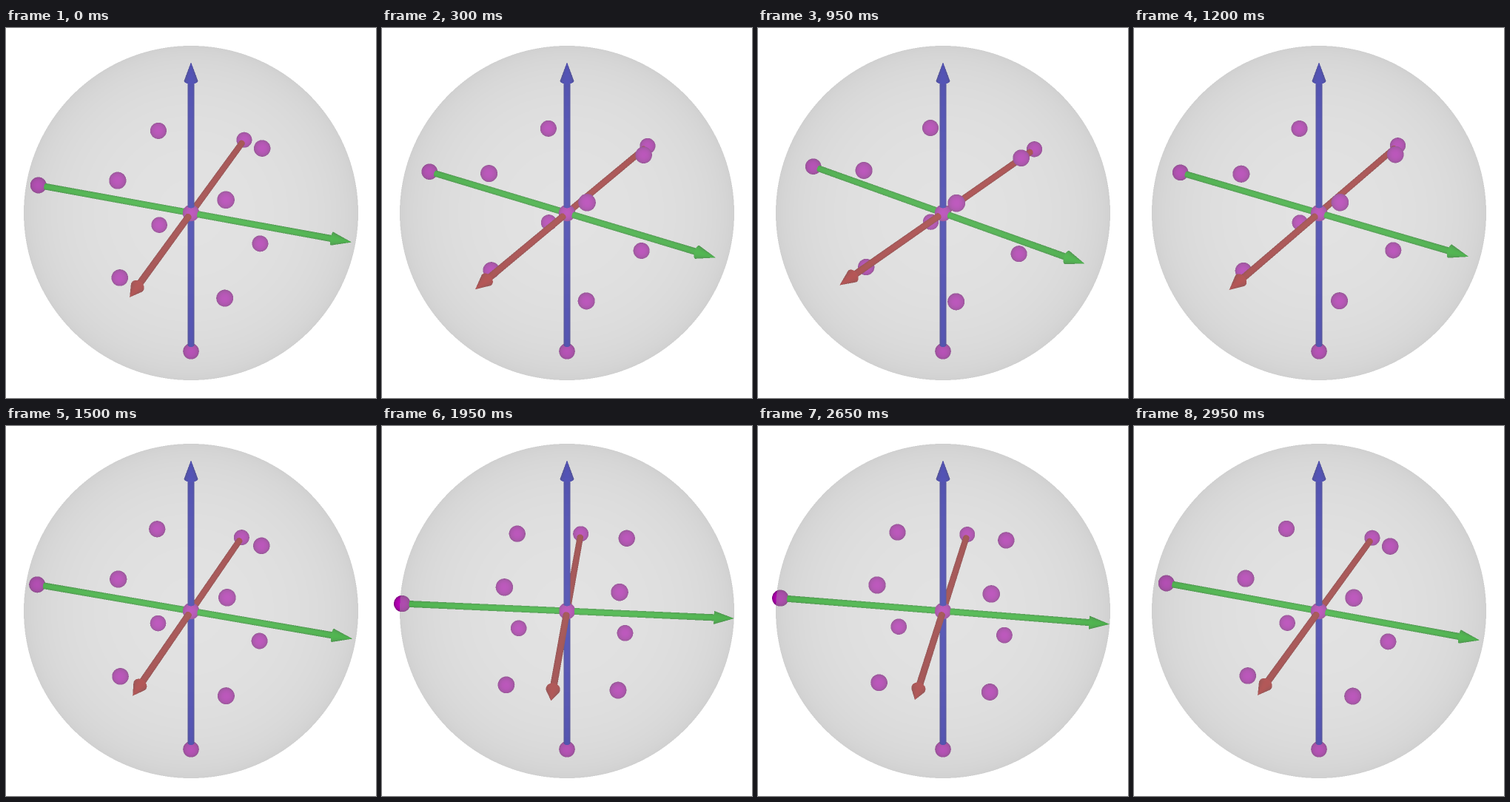
These frames come from a looping animation (500x500 px, 3 s). A matplotlib script:

```python
from itertools import product

import matplotlib.pyplot as plt
import numpy as np
from matplotlib.animation import FuncAnimation

SIZE, SS = 500, 2
FRAMES, INTERVAL = 60, 50
DIST, ELEV = 11.45, np.radians(30)
FOCAL = 226 * np.sqrt(DIST**2 - 1)

BALL_R, SHAFT_R, HEAD_R, HEAD_LEN = 0.05, 0.02, 0.04, 0.12
ALPHA = 0.47
MAGENTA = (1, 0, 1)

AXES = np.eye(3)
BALLS = [np.zeros(3), *-AXES, *(np.array(p) / 3 for p in product((-1, 1), repeat=3))]

# Viewing rays (X, Y, -1) from a camera at (0, 0, DIST)
N = SIZE * SS
pix = ((np.arange(N) + 0.5) / SS - SIZE / 2) / FOCAL
X, Y = np.meshgrid(pix, -pix)
DD = X**2 + Y**2 + 1

# Translucent unit sphere: depth of its front and its grey shade
disc = DIST**2 - DD * (DIST**2 - 1)
inside = disc > 0
front = np.where(inside, (DIST - np.sqrt(np.maximum(disc, 0))) / DD, np.inf)
glass = np.where(inside, 148 + 45 * np.clip(DIST - front, 0, 1), 0)
backdrop = np.where(inside, (1 - ALPHA) * 255 + ALPHA * glass, 255)
backdrop = np.repeat(backdrop[..., None], 3, axis=2)


def azimuth(i):
    w = 2 * np.pi * i / (FRAMES - 1)
    return np.radians(20 + 17.5 * np.sin(w) + 0.6 * np.sin(3 * w))


def view_matrix(t):
    c, s, ce, se = np.cos(t), np.sin(t), np.cos(ELEV), np.sin(ELEV)
    return np.array([[-s, c, 0], [-se * c, -se * s, ce], [ce * c, ce * s, se]])


class Scene:
    def __init__(self):
        self.depth = np.full((N, N), np.inf)
        self.rgb = np.zeros((N, N, 3))

    def window(self, points, radius):
        p = np.array(points)
        k = FOCAL / (DIST - p[:, 2])
        pad = radius * FOCAL / (DIST - 1) + 2
        cols = SIZE / 2 + p[:, 0] * k
        rows = SIZE / 2 - p[:, 1] * k

        def span(v):
            lo, hi = (v.min() - pad) * SS, (v.max() + pad) * SS
            return slice(max(int(lo), 0), min(int(hi) + 1, N))

        return span(rows), span(cols)

    def put(self, win, hit, s, nz, color):
        hit = hit & (s < self.depth[win])
        self.depth[win][hit] = s[hit]
        shade = 255 * (0.4 + 0.34 * np.clip(nz[hit], 0, 1))
        self.rgb[win][hit] = shade[:, None] * np.array(color)

    def ball(self, c, r, color):
        win = self.window([c], r)
        x, y, a = X[win], Y[win], DD[win]
        m = np.array([0, 0, DIST]) - c
        b = x * m[0] + y * m[1] - m[2]
        q = b**2 - a * (m @ m - r**2)
        s = (-b - np.sqrt(np.maximum(q, 0))) / a
        self.put(win, q > 0, s, (DIST - s - c[2]) / r, color)

    def taper(self, start, end, r0, r1, color):
        """Cylinder or cone whose radius runs from r0 to r1."""
        win = self.window([start, end], r0)
        x, y = X[win], Y[win]
        length = np.linalg.norm(end - start)
        u = (end - start) / length
        k = (r0 - r1) / length
        g = 1 + k**2
        m = np.array([0, 0, DIST]) - start
        mu = m @ u
        du = x * u[0] + y * u[1] - u[2]
        md = x * m[0] + y * m[1] - m[2]
        a = DD[win] - g * du**2
        b = md - g * mu * du + r0 * k * du
        c = m @ m - g * mu**2 + 2 * r0 * k * mu - r0**2
        q = b**2 - a * c
        s = (-b - np.sqrt(np.maximum(q, 0))) / a
        h = mu + s * du
        r = np.maximum(r0 - k * h, 1e-6)
        nz = (m[2] - s - h * u[2] + k * r * u[2]) / (r * np.sqrt(g))
        self.put(win, (q > 0) & (h >= 0) & (h <= length), s, nz, color)

    def image(self):
        img = backdrop.copy()
        hit = np.isfinite(self.depth)
        veil = np.where(self.depth[hit] > front[hit], ALPHA, 0)[:, None]
        img[hit] = (1 - veil) * self.rgb[hit] + veil * glass[hit][:, None]
        img = img.reshape(SIZE, SS, SIZE, SS, 3).mean(axis=(1, 3))
        return np.clip(img + 0.5, 0, 255).astype(np.uint8)


def render(i):
    view = view_matrix(azimuth(i))
    scene = Scene()
    for p in BALLS:
        scene.ball(view @ p, BALL_R, MAGENTA)
    for axis in AXES:
        tip = view @ axis
        neck = tip * (1 - HEAD_LEN)
        scene.taper(-tip, neck, SHAFT_R, SHAFT_R, axis)
        scene.taper(neck, tip, HEAD_R, 0, axis)
    return scene.image()


fig = plt.figure(figsize=(5, 5), dpi=100)
ax = fig.add_axes([0, 0, 1, 1])
ax.axis("off")
picture = ax.imshow(render(0), interpolation="nearest", aspect="auto")


def update(i):
    picture.set_data(render(i))
    return (picture,)


anim = FuncAnimation(fig, update, frames=FRAMES, interval=INTERVAL,
                     repeat=True, repeat_delay=0, blit=False)
plt.show()
```
